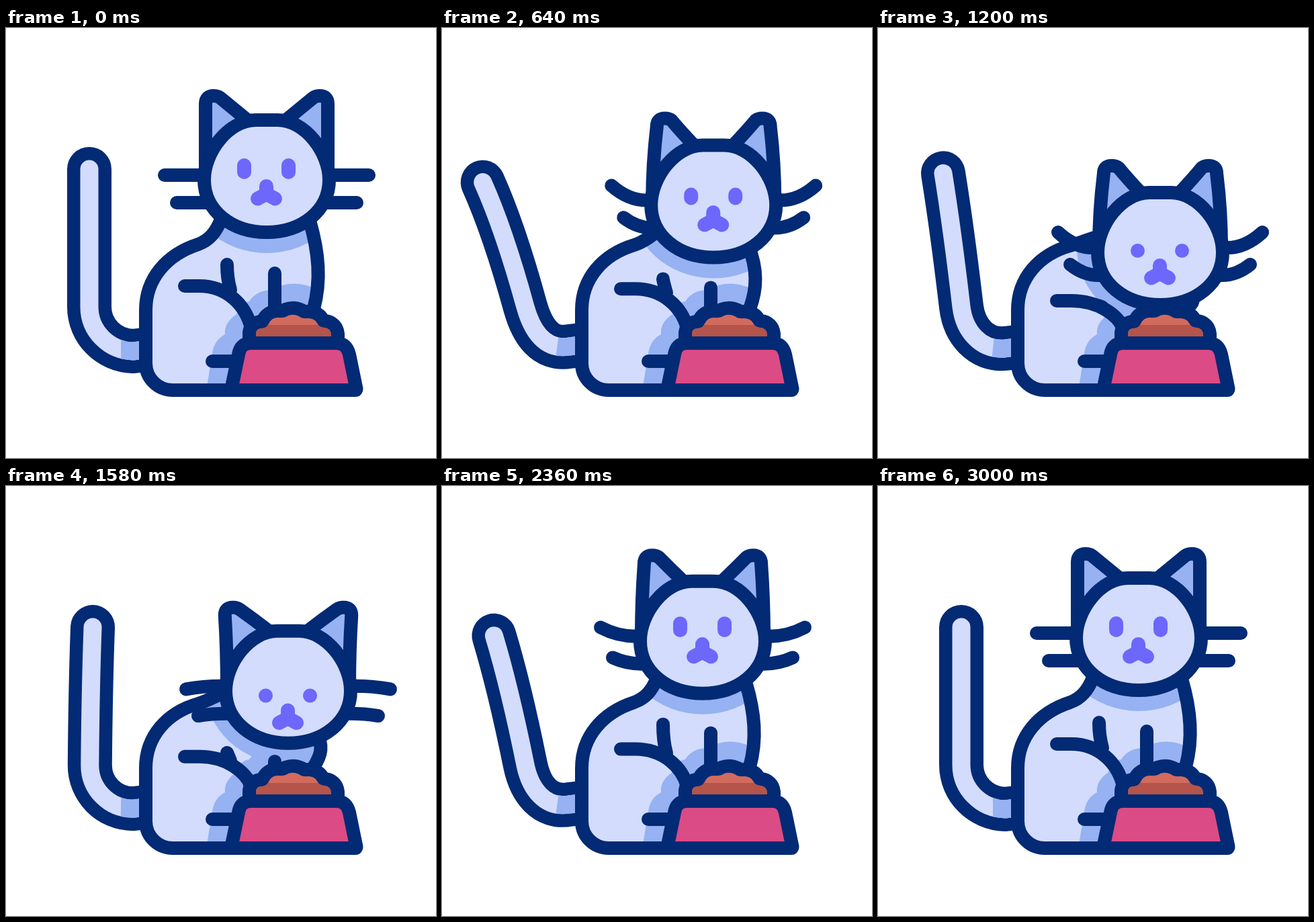
Write an HTML page with a canvas that moves like this. It is 640 by 640 pixels and loops after 3.3 s.

```html
<!DOCTYPE html>
<html lang="en">
<head>
<meta charset="utf-8">
<title>Cat at the bowl</title>
<style>
html, body { margin: 0; width: 100%; height: 100%; overflow: hidden; background: #fff }
canvas { display: block; width: 100vmin; height: 100vmin }
</style>
</head>
<body>
<canvas id="stage" width="640" height="640"></canvas>
<script>
const g = document.getElementById('stage').getContext('2d');
const INK = '#032a74', FUR = '#d3dcfc', SHADE = '#96b2f2', FACE = '#6d67fb';
const LOOP = 3300;

// Tracks: [ms, value] extremes, eased with a half cosine in between
const tracks = {
  headY: [[240, 0], [520, -37], [790, 141], [1070, 78], [1340, 141], [1600, 78], [1850, 140], [2140, -36], [2400, 7], [2750, 0]],
  headX: [[520, 0], [760, 32], [1930, 32], [2140, 0]],
  haunch: [[240, 0], [540, -11], [820, 42], [1120, 16], [1370, 41], [1640, 16], [1880, 40], [2170, -11], [2400, 9], [2700, 0]],
  bend: [[380, 0], [480, 12], [670, -24], [940, 20], [1200, -23], [1470, 22], [1730, -23], [1960, 22], [2300, -16], [2560, 6], [2800, -2], [2980, 0]],
  tail: [[300, 124], [600, 55], [890, 173], [1170, 94], [1430, 180], [1700, 94], [1950, 190], [2220, 55], [2600, 129], [2900, 124]]
};

function at(keys, t) {
  const i = keys.findIndex(k => k[0] > t);
  if (i < 0) return keys[keys.length - 1][1];
  if (i === 0) return keys[0][1];
  const [t0, a] = keys[i - 1], [t1, b] = keys[i];
  return a + (b - a) * (1 - Math.cos(Math.PI * (t - t0) / (t1 - t0))) / 2;
}

function line(d, width = 20, color = INK) {
  g.lineWidth = width;
  g.strokeStyle = color;
  g.stroke(new Path2D(d));
}

function fill(d, color) {
  g.fillStyle = color;
  g.fill(new Path2D(d));
}

function drawTail(tip) {
  const d = tip - 124;
  const y = 210 + d * d / 450 - 0.17 * Math.min(0, d);
  const mid = 124 + 0.16 * Math.max(0, d);
  const ctrl = mid + (d > 0 ? 0.23 : 0.5) * (tip - mid);
  const endY = 480 - Math.min(7, Math.abs(d) * 0.15);
  const low = mid + (mid - ctrl) * 0.32;
  const spine = `M${tip} ${y}Q${ctrl} 300 ${mid} 415C${low} 451 153 480 189 ${endY + 1}L215 ${endY - 2}`;
  line(spine, 66);
  line(spine, 27, FUR);
  // The stretch next to the body lies in shadow
  g.save();
  g.beginPath();
  const lean = Math.min(5, Math.abs(d) * 0.15);
  g.moveTo(171 + lean, 440);
  g.lineTo(171 - lean, 515);
  g.lineTo(230, 515);
  g.lineTo(230, 440);
  g.clip();
  line(spine, 27, SHADE);
  g.restore();
}

function drawBody(x, y, haunch) {
  const look = x / 32;
  const napeX = 320 + 30 * look, napeY = 285 + Math.min(0, y) + 0.17 * Math.max(0, y);
  const neckX = 452 + 8 * look, neckY = 287 + Math.min(y, 108), drop = 418 - neckY;
  const back = `V499A40 40 0 0 0 248 539H400`;
  const left = `M${napeX} ${napeY}C${312 + 13 * look} ${napeY + 20 - 14 * look} 302 ${316 + 4 * look} 286 ${322 + 2 * look}C240 337 208 372 208 420` + back;
  const right = `M${neckX} ${neckY}C${neckX + 14} ${neckY + drop * 0.37} ${neckX + 17 - 8 * look} ${neckY + drop * 0.68} 458 418`;
  const shape = left + `H458V418C${neckX + 17 - 8 * look} ${neckY + drop * 0.68} ${neckX + 14} ${neckY + drop * 0.37} ${neckX} ${neckY}Z`;

  fill(shape, FUR);
  g.save();
  g.clip(new Path2D(shape));
  g.fillStyle = SHADE;
  g.beginPath();
  g.ellipse(388 + x, 220 + y, 124, 115, 0, 0, 7);
  g.fill();
  fill('M298 540L307 484Q310 464 326 456Q324 439 343 426Q347 409 362 407Q372 391 393 390Q428 372 460 388V540Z', SHADE);
  g.restore();
  line(left);
  line(right);

  const h = 384 + haunch, s = 0.57 * y;
  line(`M266 ${h}H288C328 ${h} 357 ${412 + haunch * 0.7} 365 447`);
  line(`M329 ${352 + s}Q329 ${Math.max(372 + haunch, 352 + s)} 334 ${Math.max(h + 6, 354 + s)}`);
  line(`M400 ${365 + s}V428`);
  line('M307 496H345');
}

function drawHead(x, y, bend) {
  const look = x / 32;
  const ear = bend * (bend > 0 ? -0.7 : -0.3), lift = bend * 0.18;
  const side = `M297 220Q297 165 ${297 + ear} ${113 + lift}Q${297 + ear} ${101 + lift} ${309 + ear} ${101 + lift}`
    + `Q${315 + ear} ${101 + lift} ${319 + ear} ${104 + lift}Q${338 + ear * 0.3} ${119.5 + lift * 0.6} 358 136`;
  const whiskers = `M300 219H288Q261 219 236 ${219 + bend}M305 260H296Q274 260 254 ${260 + bend * 0.7}`;

  g.save();
  g.translate(x, y);
  for (const flip of [1, -1]) {
    g.save();
    g.translate(388, 0);
    g.scale(flip, 1);
    g.translate(-388, 0);
    fill(side + 'L388 220Z', SHADE);
    line(side);
    line(whiskers);
    g.restore();
  }
  const face = 'M372 137H404C445 137 481 185 481 226C481 272 440 304 388 304C336 304 295 272 295 226C295 185 331 137 372 137Z';
  fill(face, FUR);
  line(face);

  g.translate(0, 22 * look + 0.35 * bend);
  const half = 0.01 + 4.9 * (1 - look);
  for (const ex of [354.5, 420.5]) line(`M${ex} ${209.5 - half}V${209.5 + half}`, 21, FACE);
  g.translate(0, -4 * look);
  line('M387.5 235.5V247L374.5 254M387.5 247L400.5 254', 21, FACE);
  g.restore();
}

function drawBowl() {
  const food = 'M372 460V454Q373 447 381 447Q388 447 391 440Q395 431 405 431Q414 432 420 428Q428 425 436 429Q441 433 449 432Q459 432 463 439Q466 446 474 446Q483 447 484 456V460Z';
  line(food, 40);
  fill(food, '#d26b5d');
  g.save();
  g.clip(new Path2D(food));
  g.fillStyle = '#b4544a';
  g.fillRect(360, 442, 140, 20);
  g.restore();
  const bowl = 'M335 539L346 486Q349 469 364 469H492Q507 469 511 486L521.5 537Q521.5 539 520 539Z';
  fill(bowl, '#db4b85');
  line(bowl);
}

function draw(t) {
  const now = {};
  for (const name in tracks) now[name] = at(tracks[name], t);
  g.clearRect(0, 0, 640, 640);
  g.lineCap = g.lineJoin = 'round';
  drawTail(now.tail);
  drawBody(now.headX, now.headY, now.haunch);
  drawHead(now.headX, now.headY, now.bend);
  drawBowl();
}

const start = performance.now();
function frame() {
  draw((performance.now() - start) % LOOP);
  requestAnimationFrame(frame);
}
frame();
</script>
</body>
</html>
```
